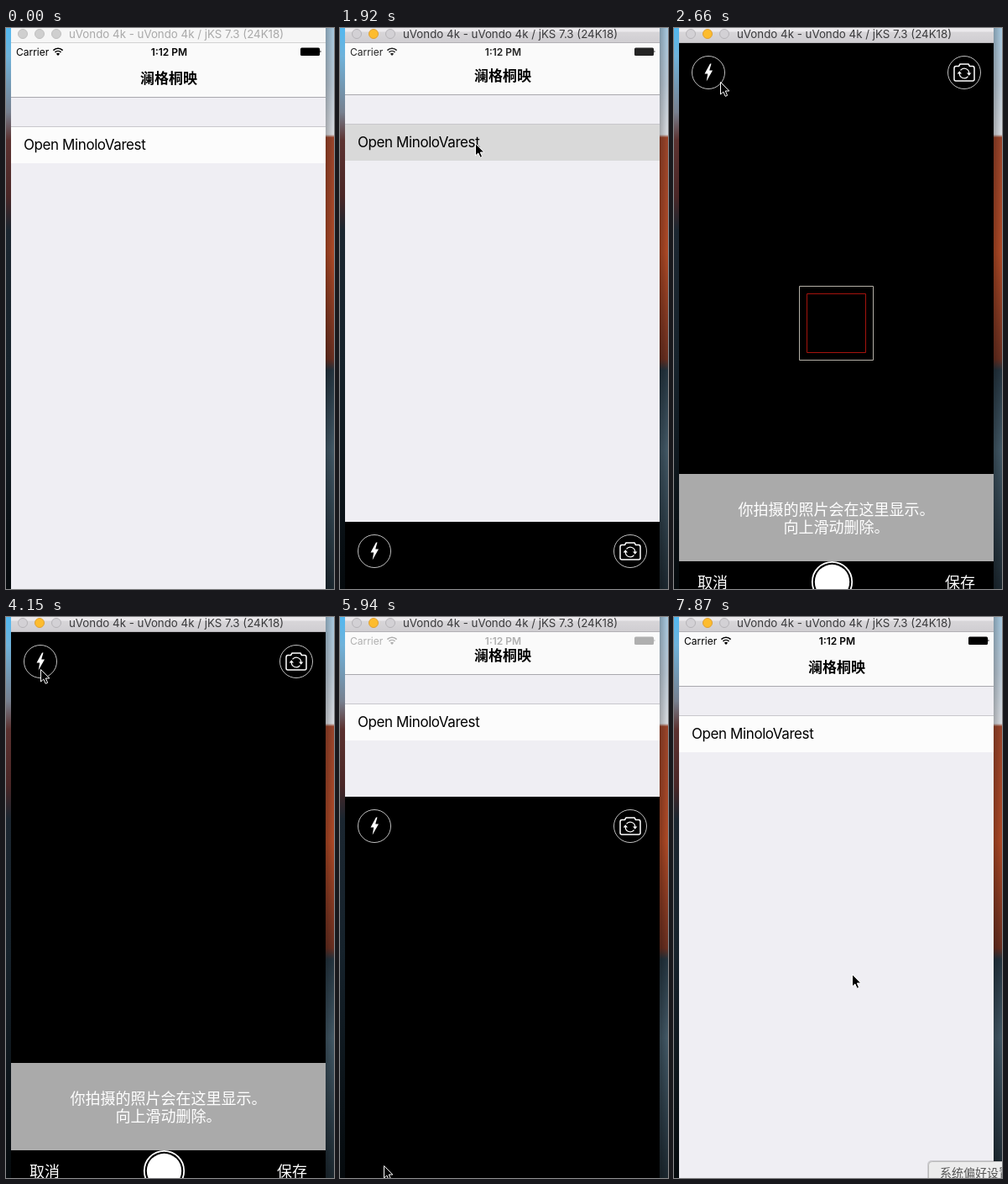
An HTML page for the animation above (8000 ms loop, 391 px wide and 668 px high).

```html
<!DOCTYPE html>
<html lang="zh">
<head>
<meta charset="utf-8">
<title>Burst camera demo</title>
<style>
  html, body { margin: 0; width: 100%; height: 100%; overflow: hidden; background: #000; }
  svg { display: block; width: 100%; height: 100%; }
  text { font-family: Inter, Roboto, "Noto Sans CJK SC", "Noto Sans CJK", sans-serif; }
  .cjk { font-family: "Noto Sans CJK SC", "Noto Sans CJK", sans-serif; }
  .mid { text-anchor: middle; }
  .line { fill: none; stroke: #fff; }

  #bar { fill: #f6f6f6; }
  #edge { fill: #d2d2d2; }
  #title { fill: #a9a9a9; }
  #dots { fill: #cfcfcf; stroke: #c0c0c0; }
  .active #bar { fill: url(#chrome); }
  .active #edge { fill: #b3b1b5; }
  .active #title { fill: #3a3a3c; }
  .active #dots { fill: #d3d1d5; stroke: #b6b4b8; }
  .active #amber { fill: #fdbc2e; stroke: #dea034; }
</style>
</head>
<body>
<svg id="stage" viewBox="0 0 391 668">
  <defs>
    <linearGradient id="left" x2="0" y2="1">
      <stop stop-color="#52b8f0"/>
      <stop offset=".05" stop-color="#6fb2da"/>
      <stop offset=".15" stop-color="#77808f"/>
      <stop offset=".2" stop-color="#5c3230"/>
      <stop offset=".3" stop-color="#4a2626"/>
      <stop offset=".36" stop-color="#1b2630"/>
      <stop offset=".6" stop-color="#16222b"/>
      <stop offset="1" stop-color="#050a0d"/>
    </linearGradient>
    <linearGradient id="right" x2="0" y2="1">
      <stop stop-color="#a9cbe2"/>
      <stop offset=".1" stop-color="#bccbd8"/>
      <stop offset=".19" stop-color="#dcdfe4"/>
      <stop offset=".195" stop-color="#9c452b"/>
      <stop offset=".4" stop-color="#b04a26"/>
      <stop offset=".59" stop-color="#6a2f20"/>
      <stop offset=".61" stop-color="#24343f"/>
      <stop offset=".75" stop-color="#435967"/>
      <stop offset="1" stop-color="#1c2830"/>
    </linearGradient>
    <linearGradient id="shade">
      <stop stop-opacity=".25"/>
      <stop offset="1" stop-opacity="0"/>
    </linearGradient>
    <linearGradient id="chrome" x2="0" y2="1">
      <stop offset=".24" stop-color="#ebe9ec"/>
      <stop offset=".26" stop-color="#d8d6d9"/>
      <stop offset="1" stop-color="#cfcdd1"/>
    </linearGradient>
    <clipPath id="screen"><path d="M6 18H381V668H6Z"/></clipPath>
  </defs>

  <!-- desktop -->
  <path fill="url(#left)" d="M0 0H6V668H0Z"/>
  <path fill="url(#right)" d="M381 0H391V668H381Z"/>
  <path fill="url(#shade)" d="M381 0H391V668H381Z"/>

  <g clip-path="url(#screen)">
    <path fill="#efeef3" d="M6 18H381V668H6Z"/>
    <g id="list">
      <path fill="#fafafa" d="M6 0H381V82H6Z"/>
      <path fill="#a9a8ad" d="M6 82H381V83H6Z"/>
      <text class="cjk mid" x="194" y="66" font-size="17" font-weight="700">澜格桐映</text>
      <path id="row" d="M6 117H381V161H6Z"/>
      <path fill="#c8c7cc" d="M6 117H381V118H6Z"/>
      <text x="21" y="145" font-size="17" letter-spacing="-.41">Open MinoloVarest</text>
    </g>

    <g id="status">
      <text x="12" y="32.5" font-size="12">Carrier</text>
      <text class="mid" x="194.5" y="32.5" font-size="12" font-weight="600">1:12 PM</text>
      <path d="M62 33l-2.1-2.3a3 3 0 0 1 4.2 0Z"/>
      <path fill="none" stroke="#000" stroke-width="1.6"
        d="M58.5 28.9a5 5 0 0 1 7 0M56.4 26.6a8 8 0 0 1 11.2 0"/>
      <rect x="351" y="23.5" width="23" height="9.5" rx="1.5"/>
      <path d="M374.5 26.5q2 1.5 0 3Z"/>
    </g>

    <g id="camera">
      <path d="M6 0H381V667H6Z"/>
      <g transform="translate(41 35)">
        <circle class="line" r="19.5" stroke-opacity=".75"/>
        <path fill="#fff" d="M2-10.5L-4.5 1.5H-.8L-2.3 10.5L5-2.5H1.2L3.5-10.5Z"/>
      </g>
      <g transform="translate(346 35)">
        <circle class="line" r="19.5" stroke-opacity=".75"/>
        <path class="line" stroke-width="1.5" stroke-linejoin="round"
          d="M-10-7.5H-6.5L-5-10H5L6.5-7.5H10Q12-7.5 12-5V8Q12 10 10 10H-10Q-12 10-12 8V-5Q-12-7.5-10-7.5Z"/>
        <path class="line" stroke-width="1.2" d="M-4.5-2.6A5.7 5.7 0 0 1 5.7 1M4.5 4.6A5.7 5.7 0 0 1-5.7 1"/>
        <path fill="#fff" d="M3 .5H8.4L5.7 3.8ZM-3 1.5H-8.4L-5.7-1.8Z"/>
      </g>
      <path fill="#aaa" d="M6 513H381V617H6Z"/>
      <g fill="#fff" font-size="18">
        <text class="cjk mid" x="193.5" y="561.5">你拍摄的照片会在这里显示。</text>
        <text class="cjk mid" x="193.5" y="582.5">向上滑动删除。</text>
        <text class="cjk mid" x="46" y="649">取消</text>
        <text class="cjk mid" x="341" y="649">保存</text>
      </g>
      <circle class="line" cx="188.5" cy="641.5" r="23.7" stroke-width="1.8"/>
      <circle fill="#fff" cx="188.5" cy="641.5" r="20.7"/>
      <g id="focus" fill="none">
        <path stroke="#b5b1a8" d="M149.5 289.5h88v88h-88Z"/>
        <path stroke="#a5130d" d="M158.5 298.5h70v70h-70Z"/>
      </g>
    </g>
  </g>

  <!-- window title bar -->
  <path id="bar" d="M6 0H381V18H6Z"/>
  <path id="edge" d="M6 17H381V18H6Z"/>
  <g id="dots">
    <circle cx="20" cy="7" r="5.5"/>
    <circle cx="40" cy="7" r="5.5" id="amber"/>
    <circle cx="60" cy="7" r="5.5"/>
  </g>
  <text id="title" x="75" y="12" font-size="13.3">uVondo 4k - uVondo 4k / jKS 7.3 (24K18)</text>

  <g id="tip">
    <rect x="302" y="647" width="120" height="40" rx="5" fill-opacity=".15"/>
    <rect x="303.5" y="648.5" width="120" height="40" rx="4" fill="#ececec" stroke="#bbb"/>
    <text class="cjk" x="317" y="667" font-size="14" fill="#555">系统偏好设置</text>
  </g>
  <path id="cursor" stroke="#fff" d="M.5 .5V15L3.8 12L6.2 17.3L8.6 16.3L6.3 11H10.8Z"/>
</svg>

<script>
const LOOP = 8000;
const TICK = 148.4, LEAD = 18; // the picture is refreshed once per tick
const STIFF = 18; // spring rate of the sheet, per second
const OPEN = 1892, CLOSE = 5876;

const $ = id => document.getElementById(id);
const shift = (id, x, y) =>
  $(id).setAttribute("transform", `translate(${Math.round(x)} ${Math.round(y)})`);
const show = (id, on) => { $(id).style.visibility = on ? "inherit" : "hidden"; };

// Critically damped spring from 0 to 1
function spring(ms) {
  const s = STIFF * Math.max(0, ms) / 1000;
  return 1 - (1 + s) * Math.exp(-s);
}

// Straight pointer moves in ticks, resting in between
const entry = { x: 349, y: 717 };
const moves = [
  { from: 1, to: 5, x: 241, y: 366 },
  { from: 7, to: 11, x: 161, y: 137 },   // to the row
  { from: 15, to: 18, x: 55, y: 64 },    // to the flash button
  { from: 18, to: 20, x: 43, y: 59 },
  { from: 27, to: 28, x: 41, y: 62 },
  { from: 29, to: 32, x: 76, y: 390 },
  { from: 32, to: 35, x: 52, y: 653 },   // to cancel
  { from: 41, to: 45, x: 102, y: 189 },
  { from: 45, to: 47, x: 200, y: 485 },
  { from: 47, to: 50, x: 373, y: 654 },  // to the dock
  { from: 52, to: 53, x: 212, y: 425 }
];

function pointer(tick) {
  let { x, y } = entry;
  for (const move of moves) {
    const part = Math.min(1, Math.max(0, (tick - move.from) / (move.to - move.from)));
    x += (move.x - x) * part;
    y += (move.y - y) * part;
  }
  return [x, y];
}

function draw(time) {
  const tick = Math.floor((time + LEAD) / TICK);
  const now = tick * TICK;
  const up = spring(now - OPEN) - spring(now - CLOSE);

  shift("cursor", ...pointer(tick));
  shift("camera", 0, 18 + 667 * (1 - up));
  shift("list", 0, -20 * up);
  $("status").style.opacity = 1 - up;
  $("row").style.fill = tick >= 12 && now < CLOSE ? "#d9d9d9" : "#fcfcfc";
  $("stage").classList.toggle("active", tick >= 11);
  show("focus", tick >= 17 && tick < 22);
  show("tip", tick >= 50);
}

const start = performance.now();
function loop() {
  draw((performance.now() - start) % LOOP);
  requestAnimationFrame(loop);
}
loop();
</script>
</body>
</html>
```
